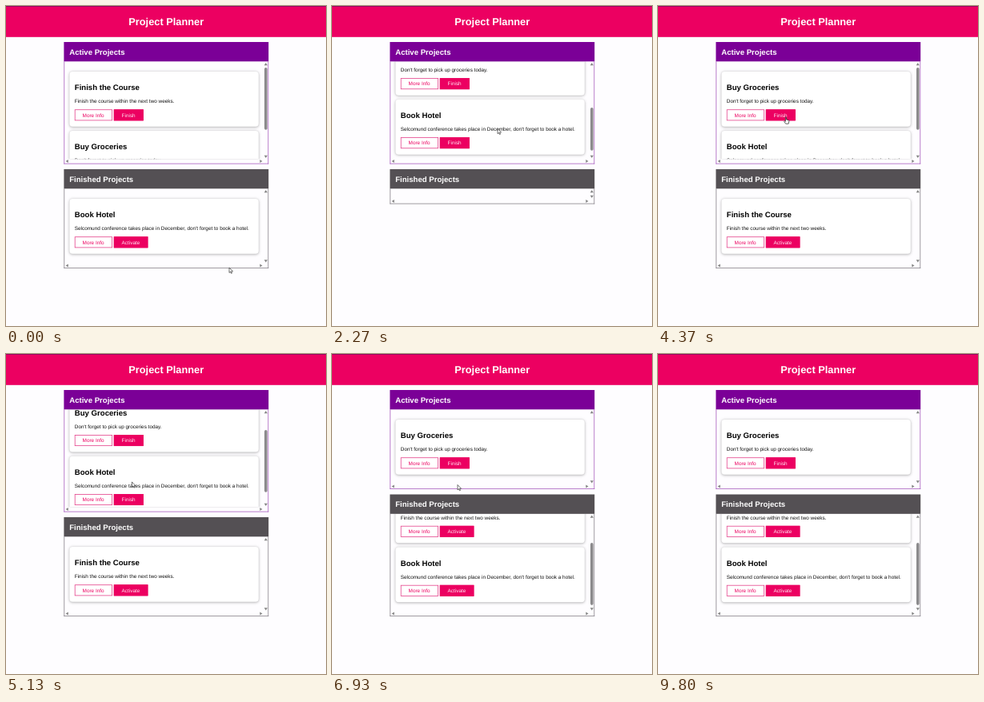
These frames come from a looping animation (400 px wide and 400 px high, 9.93 s). An HTML page with a canvas:

```html
<!DOCTYPE html>
<html lang="en">
<head>
<meta charset="utf-8">
<title>Project Planner</title>
<style>
  html, body { margin: 0; width: 100%; height: 100%; overflow: hidden; background: #fefdff; }
  canvas { display: block; width: 400px; height: 400px; }
</style>
</head>
<body>
<canvas id="stage"></canvas>
<script>
const LOOP = 9930;
const PINK = '#ec0061', PURPLE = '#7b0097', GREY = '#545054', PAGE = '#fefdff';
const LEFT = 72.4, WIDTH = 255.8, HEAD = 24.3, PITCH = 74, MAX_VIEW = 122, CARD_TOP = 12.7;

const canvas = document.getElementById('stage');
const ctx = canvas.getContext('2d');
const ratio = window.devicePixelRatio || 1;
canvas.width = canvas.height = 400 * ratio;

const course = ['Finish the Course', 'Finish the course within the next two weeks.'];
const groceries = ['Buy Groceries', "Don't forget to pick up groceries today."];
const hotel = ['Book Hotel', "Selcomund conference takes place in December, don't forget to book a hotel."];

// Each click moves one project to the other list.
const layouts = [
  { from: 0, active: [course, groceries], finished: [hotel] },
  { from: 1060, active: [course, groceries, hotel], finished: [] },
  { from: 3650, active: [groceries, hotel], finished: [course] },
  { from: 6190, active: [groceries], finished: [course, hotel] }
];

const activeScroll = [[1060, 0], [1280, 119], [2200, 119], [2670, 24], [2860, 0],
  [4750, 0], [5400, 45], [6189, 45], [6190, 0]];
const finishedScroll = [[6235, 0], [6650, 45]];
const pointer = [[0, 279, 327], [150, 279, 327], [880, 152, 295], [1300, 151.5, 297], [1450, 151.5, 297],
  [1970, 207, 165], [2300, 207, 153], [2950, 207, 153], [3400, 157, 137], [3800, 157, 137],
  [4370, 160, 139], [4600, 160, 139], [5300, 157, 163.5], [7050, 157, 163.5], [7700, 190, 289],
  [8150, 190, 289], [8800, 405, 388]];

function track(keys, t, i = 1) {
  if (t <= keys[0][0]) return keys[0][i];
  for (let k = 1; k < keys.length; k++) {
    const a = keys[k - 1], b = keys[k];
    if (t < b[0]) {
      const p = (t - a[0]) / (b[0] - a[0]);
      return a[i] + (b[i] - a[i]) * p * p * (3 - 2 * p);
    }
  }
  return keys[keys.length - 1][i];
}

function rect(color, x, y, w, h) {
  ctx.fillStyle = color;
  ctx.fillRect(x, y, w, h);
}

function rounded(color, x, y, w, h, r) {
  ctx.fillStyle = color;
  ctx.beginPath();
  ctx.roundRect(x, y, w, h, r);
  ctx.fill();
}

function label(text, x, y, size, color, weight = '') {
  ctx.font = `${weight} ${size}px "Liberation Sans", Arial, sans-serif`;
  ctx.fillStyle = color;
  ctx.fillText(text, x, y);
}

function polygon(points, fill, stroke) {
  ctx.beginPath();
  points.forEach(([x, y]) => ctx.lineTo(x, y));
  ctx.closePath();
  ctx.fillStyle = fill;
  ctx.fill();
  if (stroke) {
    ctx.strokeStyle = stroke;
    ctx.lineWidth = 0.7;
    ctx.stroke();
  }
}

// dx, dy give the direction the arrow points in.
function scrollArrow(x, y, dx, dy) {
  polygon([[x + dx * 1.6, y + dy * 1.6],
    [x - dx * 1.6 + dy * 2.1, y - dy * 1.6 + dx * 2.1],
    [x - dx * 1.6 - dy * 2.1, y - dy * 1.6 - dx * 2.1]], '#858585');
}

function button(text, x, y, w, filled) {
  rect(filled ? PINK : '#fff', x, y, w, 14);
  ctx.strokeStyle = filled ? PINK : '#e4448c';
  ctx.lineWidth = 0.8;
  ctx.strokeRect(x + 0.4, y + 0.4, w - 0.8, 13.2);
  label(text, x + 9.8, y + 9.2, 6.4, filled ? '#ffe9f3' : PINK);
}

function card([title, info], y, action) {
  ctx.save();
  ctx.shadowColor = 'rgba(0,0,0,.34)';
  ctx.shadowBlur = 3.4 * ratio;
  ctx.shadowOffsetY = 0.6 * ratio;
  rounded('#fff', 79.4, y, 236.4, 68.8, 4);
  ctx.restore();
  label(title, 85.8, y + 23.4, 9.6, '#000', 'bold');
  label(info, 85.8, y + 39.3, 6.4, '#111');
  button('More Info', 85.8, y + 47.3, 47.2, false);
  button(action, 134.8, y + 47.3, actionWidth(action), true);
}

const actionWidth = action => action === 'Finish' ? 37 : 42.6;

const listHeight = count => 6.2 + Math.min(MAX_VIEW, count ? count * PITCH + 19.5 : 13);

function section(title, top, items, scroll, action, color, edge) {
  const y = top + HEAD, height = listHeight(items.length), bottom = y + height;
  const view = height - 6.2;

  ctx.save();
  ctx.beginPath();
  ctx.rect(LEFT, y, 249, view);
  ctx.clip();
  items.forEach((item, i) => card(item, y + CARD_TOP + i * PITCH - scroll, action));
  ctx.restore();

  rect(edge, LEFT, y, 0.8, height);
  rect(edge, LEFT + WIDTH - 0.8, y, 0.8, height);
  rect(edge, LEFT, bottom - 0.8, WIDTH, 0.8);
  rect(color, LEFT, top, WIDTH, HEAD);
  label(title, 79.2, top + 15.9, 9.6, '#fff', 'bold');

  scrollArrow(324.8, y + 3.3, 0, -1);
  scrollArrow(324.8, bottom - 9.2, 0, 1);
  scrollArrow(76.2, bottom - 3.5, -1, 0);
  scrollArrow(318.9, bottom - 3.5, 1, 0);

  const content = items.length * PITCH + 19;
  if (content > MAX_VIEW + 5) {
    const rail = view - 15.5;
    rounded('#8b8a8c', 323, y + 7.6 + rail * scroll / content, 3.6, rail * view / content, 1.8);
  }
  return bottom;
}

function overButton(x, y, top, items, scroll, action) {
  const listTop = top + HEAD;
  if (y < listTop || y > listTop + listHeight(items.length) - 6) return false;
  return items.some((_, i) => {
    const by = listTop + CARD_TOP + 47.3 + i * PITCH - scroll;
    const inRow = y >= by && y <= by + 14;
    return inRow && (x >= 86 && x <= 133 || x >= 135 && x <= 134.8 + actionWidth(action));
  });
}

function arrowCursor(x, y) {
  polygon([[0, 0], [0, 6.4], [1.5, 5.1], [2.5, 7.3], [3.5, 6.9], [2.5, 4.8], [4.5, 4.7]]
    .map(([dx, dy]) => [x + dx, y + dy]), '#fff', '#333');
}

function handCursor(x, y) {
  polygon([[-0.6, 0], [0.5, 0], [0.6, 3], [3.4, 3.7], [3.8, 4.6], [3.2, 8.2], [-0.4, 8.2],
    [-2.4, 5.2], [-1.8, 4.5], [-0.6, 5.4]].map(([dx, dy]) => [x + dx, y + dy]), '#fff', '#222');
}

function draw(t) {
  ctx.setTransform(ratio, 0, 0, ratio, 0, 0);
  ctx.textRendering = 'geometricPrecision';
  rect(PAGE, 0, 0, 400, 400);
  rect(PINK, 0, 0, 400, 38.8);
  rect('#8c0a60', 0, 0, 400, 0.9);
  ctx.textAlign = 'center';
  label('Project Planner', 200.2, 23.9, 12.8, '#fff', 'bold');
  ctx.textAlign = 'left';

  const { active, finished } = layouts.filter(l => l.from <= t).pop();
  const aScroll = track(activeScroll, t), fScroll = track(finishedScroll, t);
  const aTop = 45;
  const fTop = section('Active Projects', aTop, active, aScroll, 'Finish', PURPLE, '#a85fbf') + 6.5;
  section('Finished Projects', fTop, finished, fScroll, 'Activate', GREY, '#88848a');

  const x = track(pointer, t, 1), y = track(pointer, t, 2);
  const hover = overButton(x, y, aTop, active, aScroll, 'Finish') ||
    overButton(x, y, fTop, finished, fScroll, 'Activate');
  (hover ? handCursor : arrowCursor)(x, y);
}

const start = performance.now();
function tick() {
  draw((performance.now() - start) % LOOP);
  requestAnimationFrame(tick);
}
tick();
</script>
</body>
</html>
```
